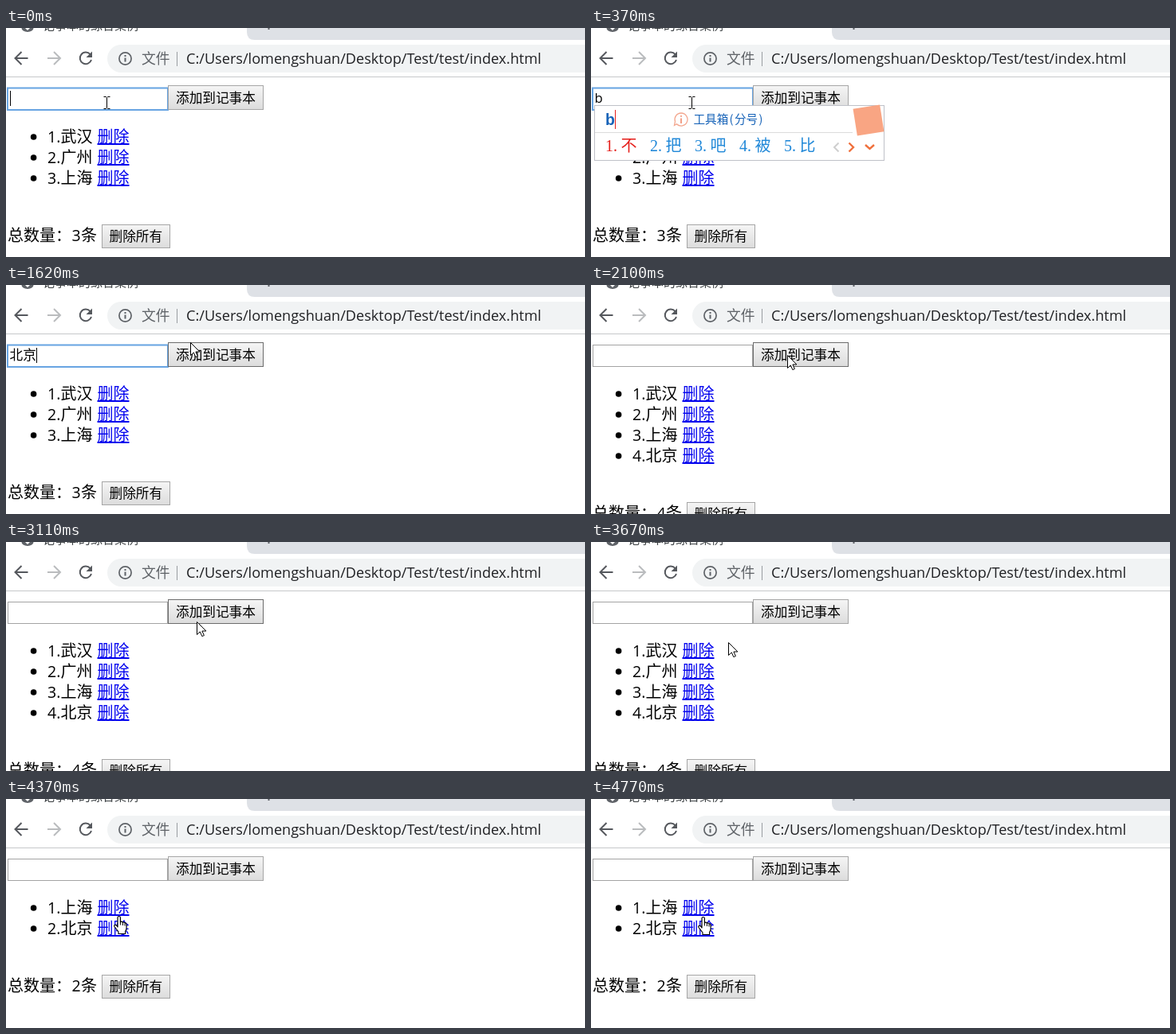
Write an HTML page that moves like this. It is 726x288 px and loops after 5470 ms.

```html
<!DOCTYPE html>
<html lang="zh-CN">
<head>
<meta charset="utf-8">
<style>
html, body { margin: 0; width: 100%; height: 100%; overflow: hidden; background: #fff; }
svg { display: block; width: 726px; height: 288px; font: 20px "Noto Sans CJK SC", "Noto Sans CJK JP", sans-serif; }
text { white-space: pre; }
.latin { font-family: "Open Sans", "Noto Sans", sans-serif; font-size: 19.5px; }
.link { fill: #00e; text-decoration: underline; text-decoration-thickness: 1px; }
.form { font-size: 16.67px; }
#typed { font-family: "Open Sans", "Noto Sans CJK SC", sans-serif; }
.btn { fill: url(#face); stroke: #a6a6a6; }
.btn.hover { stroke: #6c6c6c; }
.key { font: 20px "Liberation Serif", serif; }
.pick { fill: #2088d8; font-weight: 300; }
.first { fill: #e5201c; }
.line { fill: none; stroke-width: 2; }
</style>
</head>
<body>
<svg viewBox="0 0 726 288">
  <defs>
    <linearGradient id="face" x2="0" y2="1">
      <stop stop-color="#f5f5f5"/><stop offset="1" stop-color="#dcdcdc"/>
    </linearGradient>
  </defs>

  <!-- browser bar -->
  <path d="M302 0H726V15H312Q302 15 302 5Z" fill="#dee1e6"/>
  <path d="M329.500 0v2" stroke="#5f6368" stroke-width="2"/>
  <path d="M19.500 0a7.500 5 0 0 0 15 0z" fill="#5f6368"/>
  <path d="M24 0h6l-3 3z" fill="#fff"/>
  <text x="46" y="1.500" font-size="15" fill="#3c4043">记事本的综合案例</text>
  <path class="line" stroke="#55585d" d="M27.500 38H12M19.500 30l-8 8 8 8"/>
  <path class="line" stroke="#babcbe" d="M52 38H67.500M60 30l8 8-8 8"/>
  <path class="line" stroke="#55585d" d="M105.600 33.200A7.300 7.300 0 1 0 107 40"/>
  <path fill="#55585d" d="M108 29.500V37H100.500Z"/>
  <path d="M726 21H144.500a17.500 17.500 0 0 0 0 35H726z" fill="#f1f3f4"/>
  <circle class="line" cx="149.500" cy="38.500" r="7.600" stroke="#5f6368" style="stroke-width:1.700"/>
  <path class="line" stroke="#5f6368" d="M149.500 37.500v5M149.500 34v2"/>
  <text x="170" y="45" font-size="17.800" fill="#5f6368">文件</text>
  <path d="M214.500 30v18" stroke="#9a9da1"/>
  <text class="latin" x="226" y="45" fill="#202124" style="font-size:18.120px">C:/Users/lomengshuan/Desktop/Test/test/index.html</text>
  <path d="M0 61.500H726" stroke="#c6c8ca"/>

  <!-- input row -->
  <rect id="field" x="2.500" y="75.500" width="200" height="27" fill="#fff" stroke="#a3a3a3"/>
  <rect id="ring" x="2" y="75.500" width="201" height="27.500" fill="none" stroke="#67a4e2" stroke-width="2"/>
  <text id="typed" class="form" x="4.500" y="94.300"></text>
  <path id="caret" d="M0 79v19" stroke="#000"/>
  <rect id="add" class="btn" x="203.500" y="72.500" width="119" height="30"/>
  <text class="form" x="213" y="94.300">添加到记事本</text>

  <g id="list"></g>
  <g id="total">
    <text x="2" y="268">总数量：</text>
    <text id="count" class="latin" x="82.500" y="268"></text>
    <text x="94" y="268">条</text>
    <rect class="btn" x="120.500" y="247.500" width="85" height="29"/>
    <text class="form" x="129.500" y="268">删除所有</text>
  </g>

  <!-- input method popup -->
  <g id="popup">
    <rect id="pane" x="4.500" y="97.500" height="69" fill="#fff" stroke="#bfc1c8"/>
    <path id="rule" stroke="#dcdcdc"/>
    <text id="spell" x="18" y="122" fill="#1763b8" style="font:bold 19.500px 'Liberation Sans',sans-serif"></text>
    <path id="mark" d="M0 103v24" stroke="#e5201c"/>
    <path d="M113 107a8 8 0 1 1-5.600 13.700l-2.900 1.800 1-4.900A8 8 0 0 1 113 107z" fill="none" stroke="#f3a78f" stroke-width="1.300"/>
    <path d="M113 113.500v6.500M113 110v1.800" stroke="#f08060" stroke-width="1.500"/>
    <g fill="#1763b8" font-size="14.600" font-weight="300">
      <text x="128.500" y="120">工具箱</text><text x="173.500" y="120">(</text>
      <text x="180" y="120">分号</text><text x="210.500" y="120">)</text>
    </g>
    <g id="picks"></g>
    <g id="tail">
      <rect x="431" y="99" width="34" height="34" fill="#f9a583" transform="rotate(-9 448 116)"/>
      <path class="line" stroke="#cfcfcf" d="M410.500 144.500l-5.500 5.500 5.500 5.500"/>
      <path class="line" stroke="#f0703c" style="stroke-width:2.400" d="M423.500 144.500l5.500 5.500-5.500 5.500M444 147l5.500 5 5.500-5"/>
    </g>
  </g>

  <g id="pointer" stroke="#000" stroke-linejoin="round">
    <path id="beam" fill="none" d="M-4 -7.500h3l1 1 1-1h3M0 -6.500v13M-4 7.500h3l1-1 1 1h3"/>
    <path id="arrow" fill="#fff" d="M.5 .5V16.500l3.800-3.600 2.500 5.700 2.600-1.100-2.500-5.500h5z"/>
    <g id="hand">
      <path fill="#fff" stroke-width="1.200" d="M5 14V2.200a1.700 1.700 0 0 1 3.400 0V8a1.600 1.600 0 0 1 3 .4 1.600 1.600 0 0 1 2.700.7 1.400 1.400 0 0 1 2 1.200V15q0 2.500-1.500 4.500V22.500H6V20L1 13.500q-.8-1.700.7-2.200 1.300-.2 2.300 1.200z"/>
      <path fill="none" d="M8.400 8v3.500M11.400 8.500v3.500M14 9.500v3"/>
    </g>
  </g>
</svg>
<script>
const LOOP = 5470;
const $ = id => document.getElementById(id);

// time, shape, x, y
const moves = [
  [0, 'beam', 126.5, 94], [1470, 'beam', 160.5, 90], [1540, 'beam', 193.5, 84],
  [1620, 'arrow', 231, 72], [1700, 'arrow', 242, 83], [1840, 'arrow', 245, 87],
  [1860, 'arrow', 246, 88], [3110, 'arrow', 239, 100], [3190, 'arrow', 227, 114],
  [3265, 'arrow', 213, 130], [3340, 'arrow', 201, 142], [3510, 'arrow', 194, 137],
  [3590, 'arrow', 184, 131], [3670, 'arrow', 172, 126], [3750, 'arrow', 160, 122],
  [3830, 'hand', 146, 128], [3910, 'hand', 142, 135], [3980, 'hand', 142, 137],
  [4070, 'hand', 141, 139], [4150, 'hand', 139, 142], [4220, 'hand', 137, 145],
  [4300, 'hand', 135, 147], [4450, 'hand', 133, 149], [4770, 'hand', 134, 148]
];
// time, text, caret x (0 = hidden)
const typing = [
  [0, '', 5.5], [300, 'b', 0], [600, 'bj', 0], [1240, '北京', 38.5], [1700, '北京', 0], [2030, '', 0]
];
const lists = [
  [0, '武汉 广州 上海'], [2100, '武汉 广州 上海 北京'], [3980, '广州 上海 北京'], [4370, '上海 北京']
];
// time, spelling, caret x, pane width, candidates
const popups = [
  [0, ''], [370, 'b', 30.5, 363, '不 把 吧 被 比'],
  [600, "b'j", 41.5, 463, '北京 笔记 编辑 比较 本机'], [1240, '']
];

const at = (table, t) => table.filter(row => row[0] <= t).pop();
const show = (id, on) => $(id).style.display = on ? '' : 'none';
const move = (id, x, y) => $(id).setAttribute('transform', `translate(${x} ${y})`);

function drawList([, names]) {
  const items = names.split(' ');
  $('list').innerHTML = items.map((name, i) => `<g transform="translate(0 ${i * 26})">
    <circle cx="34.600" cy="137" r="3.800"/><text class="latin" x="52" y="144">${i + 1}.</text>
    <text x="68.500" y="144">${name}</text><text class="link" x="114.500" y="144">删除</text></g>`).join('');
  $('count').textContent = items.length;
  move('total', 0, (items.length - 3) * 26);
}

function drawPopup([, spell, mark, width, words]) {
  show('popup', spell);
  if (!spell) return;
  $('spell').textContent = spell;
  move('mark', mark, 0);
  $('pane').setAttribute('width', width);
  $('rule').setAttribute('d', `M5 131.500H${width - 35}`);
  move('tail', width - 463, 0);
  let x = 18;
  $('picks').innerHTML = words.split(' ').map((word, i) => {
    const left = x;
    x += 36 + word.length * 20;
    return `<g class="pick ${i ? '' : 'first'}"><text class="key" x="${left}" y="155">${i + 1}.</text>
      <text x="${left + 19.5}" y="155">${word}</text></g>`;
  }).join('');
}

function drawTyping([, text, caret]) {
  $('typed').textContent = text;
  show('caret', caret);
  move('caret', caret, 0);
}

function drawPointer([, shape, x, y]) {
  for (const id of ['beam', 'arrow', 'hand']) show(id, id === shape);
  move('pointer', x, y);
}

const layers = [[lists, drawList], [popups, drawPopup], [typing, drawTyping], [moves, drawPointer]];
const last = [];

function frame(now) {
  const t = now % LOOP;
  layers.forEach(([table, draw], i) => {
    const row = at(table, t);
    if (row !== last[i]) draw(last[i] = row);
  });
  show('ring', t < 2030);
  $('add').classList.toggle('hover', t >= 1620 && t < 3190);
  requestAnimationFrame(frame);
}
frame(performance.now());
</script>
</body>
</html>
```
